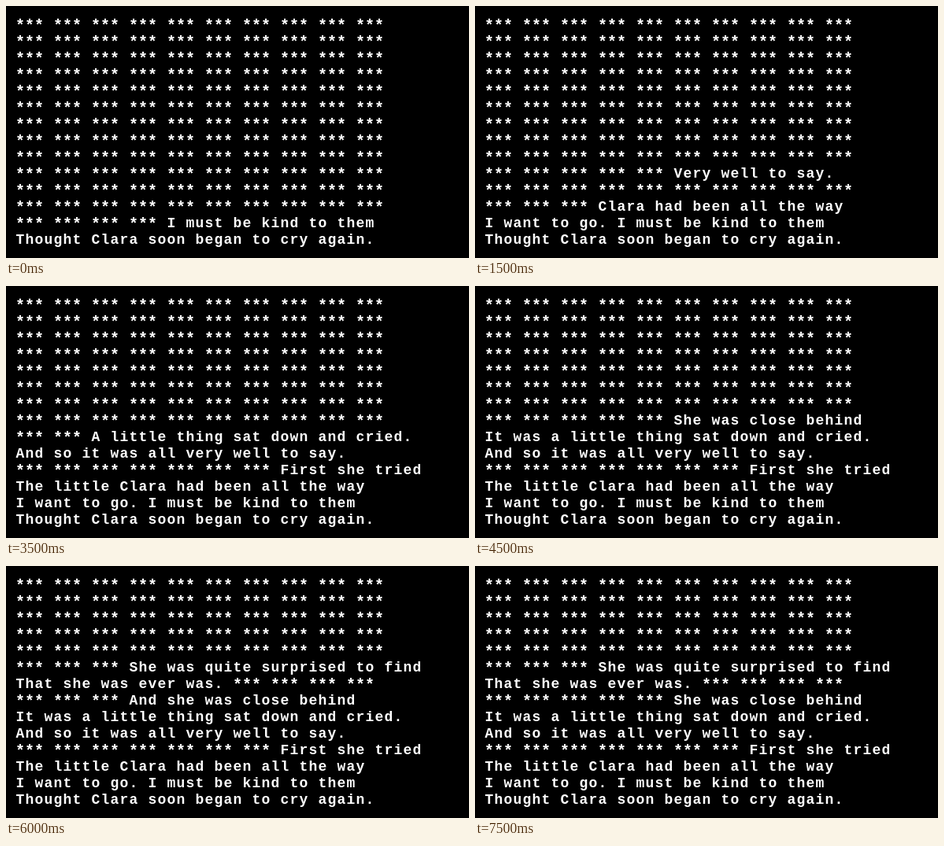
An HTML page that plays this animation: 588 by 320 pixels, repeating every 8000 ms.

```html
<!DOCTYPE html>
<html lang="en">
<head>
<meta charset="utf-8">
<title>Poem revealed</title>
<style>
html, body { margin: 0; width: 100%; height: 100%; overflow: hidden; background: #000; }
pre {
  position: absolute; left: 12.6px; top: 14px; margin: 0;
  color: #fff; font: bold 18px/21px "Liberation Mono", monospace;
}
i { position: relative; left: -.6px; top: 2px; font-style: normal; font-size: 20px; line-height: 0; }
pre, i { letter-spacing: calc(12px - 1ch); } /* every cell is 12px wide */
</style>
</head>
<body>
<pre id="poem"></pre>
<script>
const STEP = 500, STEPS = 16, ROWS = 14;
const poem = document.getElementById('poem');
const hidden = n => Array(n).fill('***').join(' ');
const behind = hidden(5) + ' She was close behind';
const andBehind = hidden(3) + ' And she was close behind';

// [step, row, new text]
const edits = [
  [0, 12, hidden(4) + ' I must be kind to them'],
  [0, 13, 'Thought Clara soon began to cry again.'],
  [1, 11, hidden(3) + ' Clara had been all the way'],
  [1, 12, 'I want to go. I must be kind to them'],
  [2, 9, hidden(5) + ' Very well *** ***'],
  [3, 9, hidden(5) + ' Very well to say.'],
  [4, 9, 'And so it was all very well to say.'],
  [5, 8, hidden(6) + ' Sat down and cried.'],
  [5, 10, hidden(7) + ' First she tried'],
  [5, 11, 'The little Clara had been all the way'],
  [6, 8, hidden(3) + ' Little thing sat down and cried.'],
  [7, 8, hidden(2) + ' A little thing sat down and cried.'],
  [8, 8, 'It was a little thing sat down and cried.'],
  [9, 7, behind],
  [10, 5, hidden(3) + ' She was quite surprised to find'],
  [10, 6, 'That ' + hidden(9)],
  [11, 6, 'That she was ever was. ' + hidden(4)],
  [12, 7, andBehind],
  [13, 7, behind],
  [14, 7, andBehind],
  [15, 7, behind]
];

let shown = -1;
function draw() {
  const now = Math.floor(performance.now() / STEP) % STEPS;
  if (now !== shown) {
    const lines = Array(ROWS).fill(hidden(10));
    for (const [step, row, text] of edits) if (step <= now) lines[row] = text;
    poem.innerHTML = lines.join('\n').replace(/\*+/g, '<i>$&</i>');
    shown = now;
  }
  requestAnimationFrame(draw);
}
draw();
</script>
</body>
</html>
```
